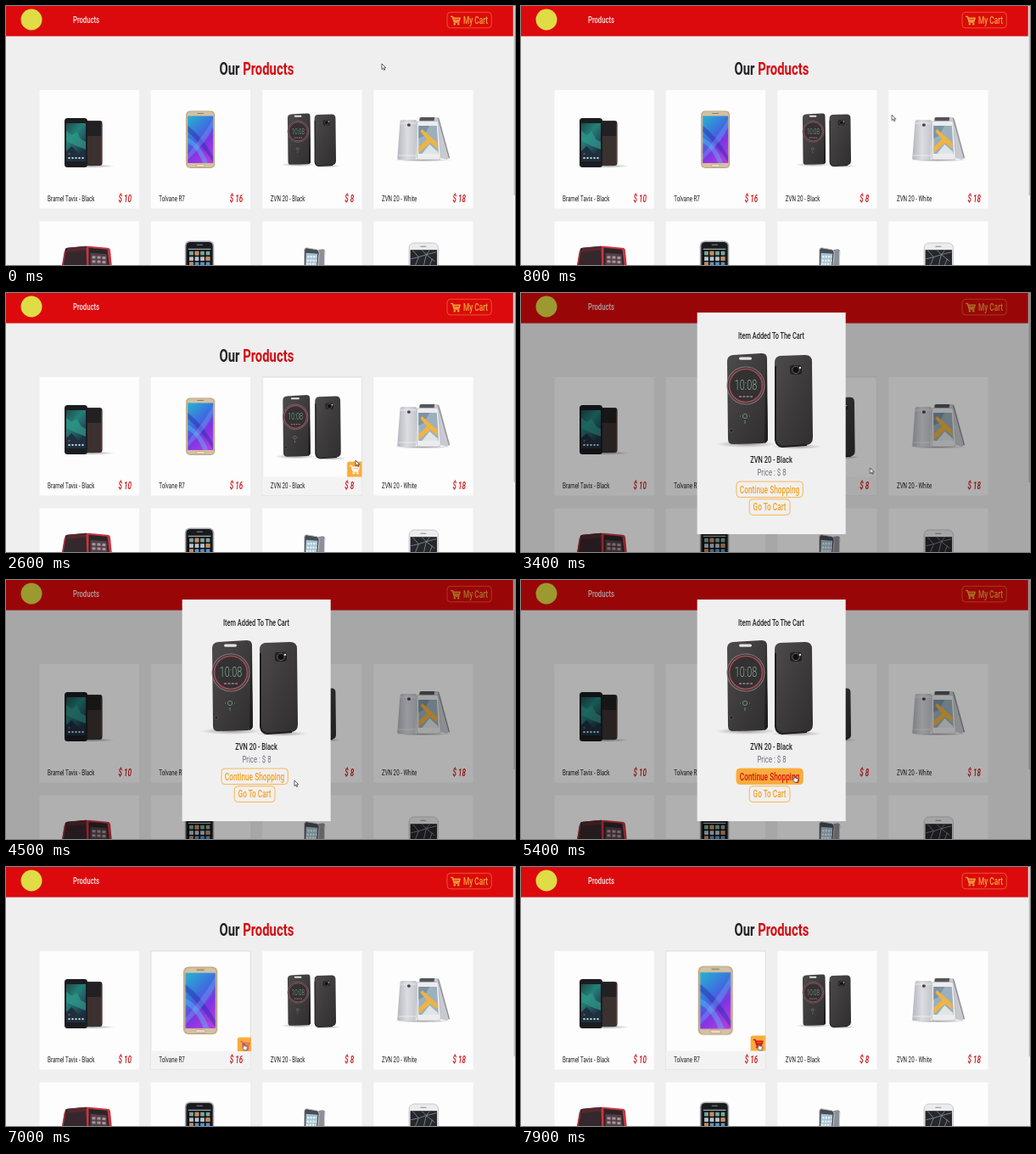
An HTML page that plays this animation: 600 by 305 pixels, repeating every 8 s.

```html
<!DOCTYPE html>
<html lang="en">
<head>
<meta charset="utf-8">
<title>Phone shop</title>
<style>
html, body { margin: 0; height: 100%; overflow: hidden; background: #f0eff0; }
svg { display: block; }
#stage { width: 100vw; height: 100vh; }

/* one condensed look for all text */
text {
  font-family: Roboto, "Liberation Sans", sans-serif;
  font-weight: 400;
  transform-box: fill-box;
  transform-origin: 0 0;
  transform: scaleX(.68);
}
.mid { text-anchor: middle; transform-origin: 50% 0; }
.title { font-size: 20.6px; font-weight: 700; transform: scaleX(.72); }
.nav { font-size: 11.3px; font-weight: 500; }
.name { font-size: 9.2px; fill: #1d1d20; }
.price { font-size: 12px; font-weight: 500; font-style: italic; fill: #cc1216; }
.btn { font-size: 12.2px; font-weight: 500; }
.dial { font-size: 16px; font-weight: 300; }
.box { fill: #fdfdfd; }

/* every part shares one 8 s loop */
.grow-a, .grow-b, .tint-a, .tint-b, .slide-a, .slide-b, .cart-b,
.modal, .fill, .label, .cursor, .arrow, .hand { animation: 8s linear infinite; }

.grow-a { animation-name: growA; }
.grow-b { animation-name: growB; }
.tint-a { animation-name: tintA; }
.tint-b { animation-name: tintB; }
.slide-a { animation-name: slideA; }
.slide-b { animation-name: slideB; }
.cart-b { animation-name: cartB; }
.modal { animation-name: modal; animation-timing-function: step-end; }
.fill { animation-name: fill; }
.label { animation-name: label; }
.cursor { animation-name: move; }
.arrow { animation-name: arrow; animation-timing-function: step-end; }
.hand { animation-name: hand; animation-timing-function: step-end; }

@keyframes growA {
  0%, 16.25%, 52.5%, 100% { transform: scale(1); }
  28.75%, 40% { transform: scale(1.2); }
}
@keyframes growB {
  0%, 76.5% { transform: scale(1); }
  89%, 100% { transform: scale(1.2); }
}
@keyframes tintA {
  0%, 16.25%, 50%, 100% { opacity: 0; }
  18.75%, 40% { opacity: 1; }
}
@keyframes tintB {
  0%, 76.5% { opacity: 0; }
  80%, 100% { opacity: 1; }
}
@keyframes slideA {
  0%, 16.25% { transform: translate(18px, 18px); }
  28.75%, 40% { transform: none; }
  40.01%, 100% { transform: translate(18px, 18px); }
}
@keyframes slideB {
  0%, 76.5% { transform: translate(18px, 18px); }
  89%, 100% { transform: none; }
}
@keyframes cartB {
  0%, 85% { color: #fff; }
  89%, 100% { color: #dc0a0c; }
}
@keyframes modal {
  0% { visibility: hidden; }
  40% { visibility: visible; }
  72.5%, 100% { visibility: hidden; }
}
@keyframes fill {
  0%, 58.5% { fill: #f9ab3c00; }
  64%, 100% { fill: #f9ab3c; }
}
@keyframes label {
  0%, 58.5% { fill: #f2a31f; }
  64%, 100% { fill: #d8120f; }
}
@keyframes move {
  0%, 5% { transform: translate(443px, 68px); }
  11% { transform: translate(436px, 140px); }
  16.25% { transform: translate(417px, 203px); }
  18.75%, 28.75% { transform: translate(414px, 208.5px); }
  32.5%, 40% { transform: translate(412px, 197px); }
  42.5%, 47.5% { transform: translate(411.5px, 206px); }
  56.25% { transform: translate(340px, 236px); }
  60%, 71.25% { transform: translate(320.5px, 230px); }
  76.25% { transform: translate(284px, 216.5px); }
  82.5%, 100% { transform: translate(278.5px, 207.5px); }
}
@keyframes arrow {
  0% { visibility: visible; }
  33.75% { visibility: hidden; }
  40% { visibility: visible; }
  58.5% { visibility: hidden; }
  72.5% { visibility: visible; }
  85%, 100% { visibility: hidden; }
}
@keyframes hand {
  0% { visibility: hidden; }
  33.75% { visibility: visible; }
  40% { visibility: hidden; }
  58.5% { visibility: visible; }
  72.5% { visibility: hidden; }
  85%, 100% { visibility: visible; }
}
</style>
</head>
<body>
<svg id="stage" viewBox="0 0 600 305">
<defs>
  <linearGradient id="violet" x1=".2" y1="0" x2=".7" y2="1">
    <stop offset="0" stop-color="#2aa9d2"/>
    <stop offset=".4" stop-color="#3f6ce0"/>
    <stop offset=".65" stop-color="#7c35e4"/>
    <stop offset="1" stop-color="#b23be0"/>
  </linearGradient>
  <linearGradient id="teal" x1="0" y1="0" x2=".6" y2="1">
    <stop offset="0" stop-color="#1f4a4c"/>
    <stop offset=".4" stop-color="#238079"/>
    <stop offset=".7" stop-color="#25525e"/>
    <stop offset="1" stop-color="#1b2633"/>
  </linearGradient>
  <linearGradient id="dark" x1="0" y1="0" x2="1" y2="1">
    <stop offset="0" stop-color="#4d4b4b"/>
    <stop offset=".5" stop-color="#3d3b3b"/>
    <stop offset="1" stop-color="#302e2e"/>
  </linearGradient>
  <linearGradient id="silver" x1="0" y1="0" x2="1" y2="0">
    <stop offset="0" stop-color="#b4b6be"/>
    <stop offset=".5" stop-color="#dcdde2"/>
    <stop offset="1" stop-color="#c3c5cc"/>
  </linearGradient>
  <radialGradient id="shade">
    <stop offset="0" stop-color="#777" stop-opacity=".7"/>
    <stop offset="1" stop-color="#777" stop-opacity="0"/>
  </radialGradient>

  <g id="card">
    <rect class="box" width="117.3" height="139.5"/>
  </g>
  <g id="lit">
    <rect width="117.3" height="139.5" fill="#fdfdfd" stroke="#dadada" stroke-width=".9"/>
    <rect y="117.5" width="117.3" height="22" fill="#f4f3f4"/>
  </g>
  <clipPath id="pane"><rect width="117.3" height="117.5"/></clipPath>

  <g id="cart" fill="none" stroke="currentColor" stroke-width="1.3" stroke-linejoin="round" stroke-linecap="round">
    <path d="M.7 1H2.6L4.2 7.5H10"/>
    <path d="M3 2.6H11.3L10.2 6H3.9Z" fill="currentColor" fill-opacity=".5"/>
    <circle cx="4.8" cy="9.8" r=".6"/>
    <circle cx="9.3" cy="9.8" r=".6"/>
  </g>
  <g id="add">
    <path d="M99.8 117.5V102.5a3 3 0 0 1 3-3H117.3V117.5Z" fill="#f9ab3c"/>
    <use href="#cart" x="102.8" y="103.5"/>
  </g>

  <!-- dark pair, drawn at its large size -->
  <g id="duo">
    <ellipse cx="-28" cy="52" rx="36" ry="4" fill="url(#shade)"/>
    <ellipse cx="32" cy="55" rx="30" ry="3" fill="url(#shade)"/>
    <path d="M-43-53L-9-55Q-3-55-3-49L-2 46Q-2 50-8 51L-43 52Q-49 52-49 46L-50-46Q-50-52-43-53Z" fill="url(#dark)"/>
    <path d="M-4-52L-2 46Q-2 49-6 51Z" fill="#201f1f"/>
    <rect x="-36" y="-50.5" width="15" height="3.2" rx="1.6" fill="#e4e4e4"/>
    <circle cx="-28" cy="-17" r="22" fill="#333132" stroke="#857d7f" stroke-width="1.1"/>
    <circle cx="-28" cy="-17" r="19.5" fill="none" stroke="#a14d5b" stroke-width="1.7"/>
    <text class="dial mid" x="-28" y="-12" fill="#86ab9f">10:08</text>
    <path d="M-36-4H-20" stroke="#8b6c70" stroke-width="2" stroke-dasharray="3 1.4"/>
    <circle cx="-29" cy="19" r="2.6" fill="none" stroke="#6f8a81"/>
    <path d="M-29 24V28M-34 19H-35M-24 19H-23" stroke="#6f8a81"/>
    <circle cx="-45" cy="36" r="2" fill="#201f1f" stroke="#777" stroke-width=".5"/>
    <path d="M12-52L42-53Q50-53 50-45L51 44Q51 52 44 53L15 55Q7 54 7 47L6-44Q6-51 12-52Z" fill="url(#dark)"/>
    <path d="M7-40V47Q8 54 15 55L44 53" fill="none" stroke="#1f1e1e" stroke-width="2"/>
    <rect x="24" y="-41" width="14" height="11" rx="3" fill="#222121"/>
    <circle cx="31" cy="-35.5" r="4.2" fill="#111" stroke="#777" stroke-width=".8"/>
    <circle cx="36" cy="-38" r="1.2" fill="#e6ddc8"/>
  </g>

  <g id="gold">
    <rect x="-17" y="-33.6" width="34" height="67.6" rx="5" fill="#b39b78"/>
    <rect x="-16" y="-32.8" width="32" height="66" rx="4.4" fill="#d3c1a2"/>
    <rect x="-15" y="-27.5" width="30" height="55.5" fill="url(#violet)"/>
    <path d="M-15-16Q2-3 15 20V27Q-1 3-15-9Z" fill="#2a2fae" opacity=".5"/>
    <path d="M-15-2Q0 5 9 28H3Q-4 10-15 4Z" fill="#55c3ee" opacity=".45"/>
    <path d="M15-24Q6-8-15 18V24Q8 2 15-15Z" fill="#68b8f0" opacity=".35"/>
    <rect x="-4" y="-31" width="8" height="1" rx=".5" fill="#8f7c5e"/>
    <rect x="-5" y="29.4" width="10" height="2.8" rx="1.4" fill="#eee2ca" stroke="#a48d68" stroke-width=".5"/>
  </g>

  <g id="arrowShape">
    <path d="M0 0V6.6L1.6 5.2L2.7 7.6L3.7 7.1L2.7 4.8H4.7Z" fill="#fff" stroke="#222" stroke-width=".7"/>
  </g>
  <g id="handShape">
    <path d="M1.2.5Q2-.2 2.6.6V3L5.5 3.7Q6.3 4 6.1 5L5.6 8.2H2.2L.1 5.4Q-.1 4.4 1.2 4.8Z" fill="#fff" stroke="#222" stroke-width=".7"/>
  </g>
</defs>

<rect width="600" height="305" fill="#f0eff0"/>
<rect width="600" height="35.6" fill="#dc0a0c"/>
<circle cx="30" cy="16" r="12.5" fill="#dfdc45"/>
<text class="nav" x="79" y="20.3" fill="#f7e9e9">Products</text>
<g color="#f3a43a">
  <rect x="520" y="7.3" width="52.3" height="18.5" rx="4" fill="none" stroke="#ea6a2c" stroke-width=".8"/>
  <use href="#cart" x="524" y="11.5"/>
  <text class="btn" x="539" y="21" fill="currentColor">My Cart</text>
</g>

<text class="title" x="251.5" y="81" fill="#212126">Our <tspan fill="#d60b10">Products</tspan></text>

<!-- first row -->
<g transform="translate(39.5 99)">
  <use href="#card"/>
  <ellipse cx="62" cy="89.5" rx="27" ry="2.2" fill="url(#shade)"/>
  <rect x="53" y="36" width="21" height="53" rx="3" fill="#3a3130"/>
  <path d="M55 39Q55 37 57 37H71Q73 37 73 39V54H55Z" fill="#222022"/>
  <path d="M73.5 40V85" stroke="#82564e" stroke-width=".8"/>
  <rect x="29.5" y="33" width="27" height="58" rx="3.5" fill="#1b1c20"/>
  <rect x="31.5" y="39" width="23" height="45" fill="url(#teal)"/>
  <path d="M31.5 48L38 53L44 49L49 58L54.5 61V70L44 66L31.5 60Z" fill="#2f9a8b" opacity=".7"/>
  <path d="M31.5 72L38 66L46 75L54.5 71V84H31.5Z" fill="#1d3040"/>
  <path d="M34 80H52" stroke="#d5d8d0" stroke-width="1.9" stroke-dasharray="2 2"/>
  <circle cx="35" cy="75" r="1" fill="#b64b3d"/>
  <text class="name" x="9.5" y="131.5">Bramel Tavix - Black</text>
  <text class="price" x="93" y="132.5">$ 10</text>
</g>

<g transform="translate(170.8 99)">
  <use href="#card"/>
  <use href="#lit" class="tint-b"/>
  <g clip-path="url(#pane)">
    <g transform="translate(58.4 58)"><g class="grow-b"><use href="#gold"/></g></g>
    <g class="slide-b"><g class="cart-b"><use href="#add"/></g></g>
  </g>
  <text class="name" x="9.5" y="131.5">Tolvane R7</text>
  <text class="price" x="93" y="132.5">$ 16</text>
</g>

<g transform="translate(302.2 99)">
  <use href="#card"/>
  <use href="#lit" class="tint-a"/>
  <g clip-path="url(#pane)">
    <g transform="translate(58 58.4)"><g class="grow-a"><use href="#duo" transform="scale(.565)"/></g></g>
    <g class="slide-a" color="#fff"><use href="#add"/></g>
  </g>
  <text class="name" x="9.5" y="131.5">ZVN 20 - Black</text>
  <text class="price" x="97" y="132.5">$ 8</text>
</g>

<g transform="translate(433.4 99)">
  <use href="#card"/>
  <ellipse cx="58" cy="82.5" rx="34" ry="1.8" fill="url(#shade)"/>
  <path d="M54 37V34Q54 32 56 32H71Q73 32 73 34V38Z" fill="#55565c"/>
  <path d="M72 32H75Q77 32 78 35L90 80L86 82L79 80L70 42Z" fill="#c9cad0"/>
  <path d="M76 33L89 80" stroke="#77787f" stroke-width=".9"/>
  <path d="M34 35H49Q51 35 51 38L50 79Q50 82 47 82H30Q27 82 28 79L31 38Q31 35 34 35Z" fill="url(#silver)"/>
  <circle cx="41.5" cy="41" r="2" fill="#45464d"/>
  <path d="M29 77H50M31 39H50" stroke="#f4f4f7" stroke-width=".7"/>
  <path d="M53 36.5H74Q76 36.5 76.3 39L79 79Q79 82 76 82H54Q51 82 51 79V39Q51 36.5 53 36.5Z" fill="#ececee" stroke="#b5b6bd" stroke-width=".7"/>
  <path d="M53 42H74.5L76.5 75H53Z" fill="#9bb0bd"/>
  <path d="M53 42H66L59 54L53 57Z" fill="#7c94a3"/>
  <path d="M57 46L75 62V69L67 62L53 74V67L63 58L55 49Z" fill="#efb443"/>
  <path d="M66 64L76 73V75H57Z" fill="#dfe5e6"/>
  <text class="name" x="9.5" y="131.5">ZVN 20 - White</text>
  <text class="price" x="93" y="132.5">$ 18</text>
</g>

<!-- second row, cut by the lower edge -->
<g transform="translate(39.5 253.7)">
  <use href="#card"/>
  <path d="M33 31L55 29Q58 29 58 32V60H25L30 34Q30 31 33 31Z" fill="#35282d"/>
  <path d="M30 35L26 60M57 31V60" stroke="#b5313c" stroke-width="1.6"/>
  <path d="M33 31L55 29L54 34L32 36Z" fill="#57282f"/>
  <path d="M58 29L80 31Q83 31 83.5 34L86 60H56L55 32Q55 29 58 29Z" fill="#c93541"/>
  <path d="M58 31L80 33L83 60H58Z" fill="#2b2528"/>
  <path d="M60 37L79 38.5L81 60H60Z" fill="#54404a"/>
  <path d="M62 42L78 43M62 47L79 48" stroke="#a9959a" stroke-width="3" stroke-dasharray="4 2"/>
</g>

<g transform="translate(170.8 253.7)">
  <use href="#card"/>
  <rect x="40" y="22.8" width="34.5" height="60" rx="6" fill="#a9aaae"/>
  <rect x="41.6" y="24.2" width="31.3" height="58" rx="5" fill="#1a1b1e"/>
  <path d="M54 27.5H61" stroke="#888" stroke-width="1"/>
  <rect x="44" y="32" width="26.6" height="30" fill="#0b0c0e"/>
  <path d="M44 32.7H70.6" stroke="#9ba5ad" stroke-width="1.4"/>
  <g fill="none" stroke-width="4.8" stroke-dasharray="4.8 1.7">
    <path d="M45.3 37.5H70" stroke="#7aa596"/>
    <path d="M45.3 43.9H70" stroke="#b8c3cc"/>
    <path d="M45.3 50.2H70" stroke="#5a92c4"/>
  </g>
  <path d="M51.8 37.5H56.6M64.8 43.9H69.6M45.3 50.2H50.1" stroke="#c98a5c" stroke-width="4.8"/>
</g>

<g transform="translate(302.2 253.7)">
  <use href="#card"/>
  <path d="M62 34L71 32.5Q74 32.5 74 36L73 60H62Z" fill="#8d9095"/>
  <path d="M73.5 35L73 60" stroke="#d5d6da"/>
  <path d="M52 31L64 33Q67 34 67 37L65 60H49L49.5 34Q49.5 31 52 31Z" fill="#4a4d52" stroke="#c9cace" stroke-width="1"/>
  <path d="M51.5 37L65 38L63.5 60H50.5Z" fill="#a4c3d6"/>
  <path d="M53 41.5H64M52.5 46H64M52 50H63" stroke="#e8efee" stroke-width="2.4" stroke-dasharray="2.3 1.1"/>
</g>

<g transform="translate(433.4 253.7)">
  <use href="#card"/>
  <rect x="41.7" y="25.3" width="34.5" height="60" rx="6" fill="#ececed" stroke="#bebec1" stroke-width=".8"/>
  <path d="M55 29.5H62" stroke="#8a8a8d"/>
  <rect x="43.2" y="33.5" width="31.5" height="30" fill="#24272c"/>
  <path d="M46 34L53 42L49 52M53 42L62 39L72 47M62 39L66 34M62 39L59 52M69 44L66 52M44 44L53 42M57 34L62 39L74 36" fill="none" stroke="#9fa3a8" stroke-width=".7"/>
</g>

<rect x="597.8" width="2.2" height="305" fill="#f4f4f4"/>
<rect x="598.6" width="1.4" height="223" fill="#c1c1c1"/>

<g class="modal">
  <rect width="600" height="305" opacity=".3"/>
  <rect x="207.7" y="23" width="175" height="261" fill="#f1f0f1"/>
  <text class="mid" x="295" y="54.3" font-size="10.9" style="font-weight:500" fill="#222226">Item Added To The Cart</text>
  <use href="#duo" transform="translate(293 126)"/>
  <text class="mid" x="295" y="200.3" font-size="11" style="font-weight:500" fill="#222226">ZVN 20 - Black</text>
  <text class="mid" x="295.5" y="215.3" font-size="11.5" fill="#6f7378">Price : $ 8</text>
  <g stroke="#f6b041" stroke-width=".9" fill="none">
    <rect class="fill" x="254" y="222" width="78.3" height="18.6" rx="4"/>
    <rect x="269.2" y="242.8" width="47.8" height="18.6" rx="4"/>
  </g>
  <text class="btn mid label" x="293" y="236">Continue Shopping</text>
  <text class="btn mid" x="293" y="256.5" fill="#f2a31f">Go To Cart</text>
</g>

<g class="cursor">
  <use href="#arrowShape" class="arrow"/>
  <use href="#handShape" class="hand"/>
</g>
</svg>
</body>
</html>
```
